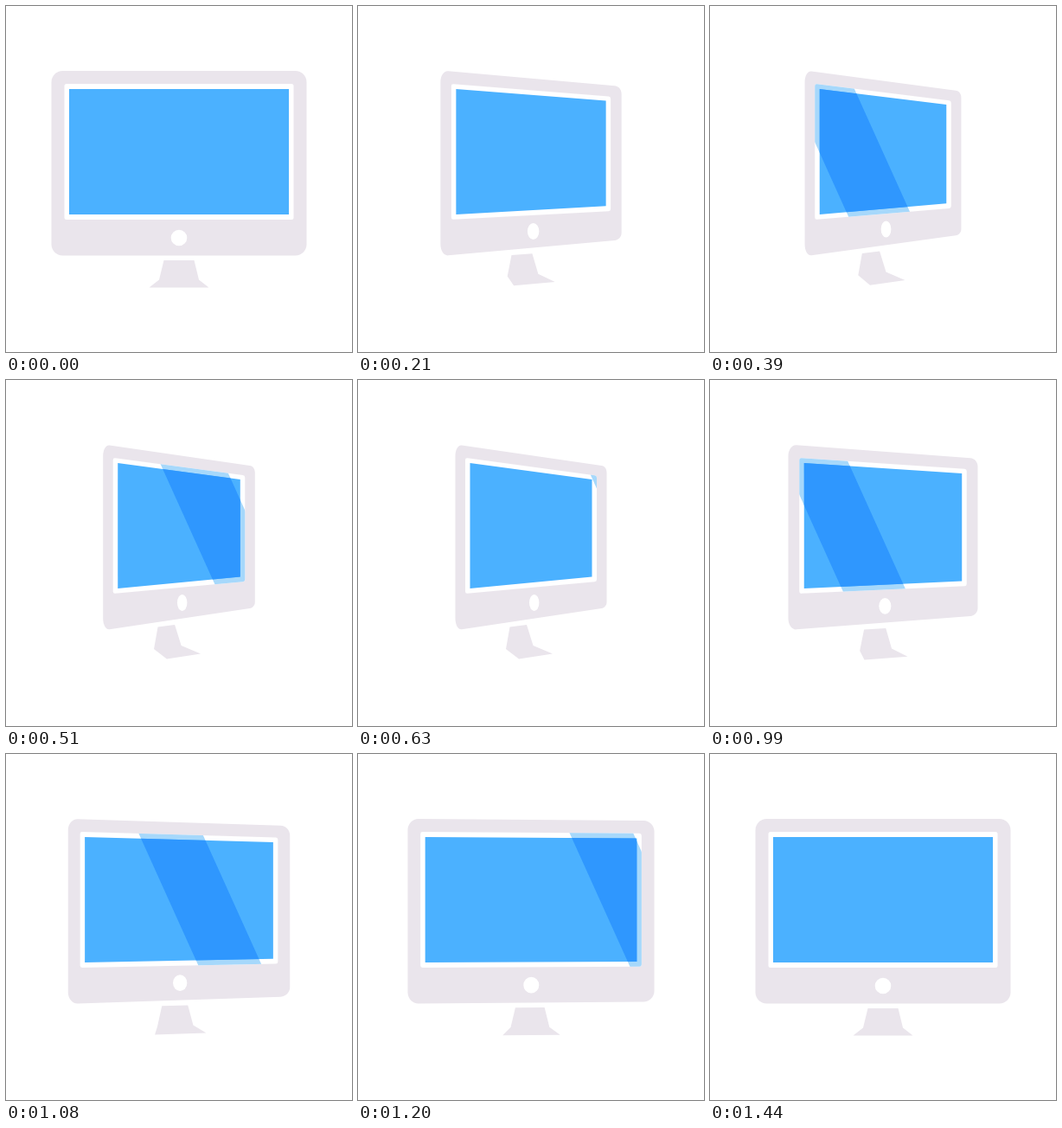
These frames come from a looping animation (400x400 px, 3620 ms). An HTML page:

```html
<!DOCTYPE html>
<html lang="en">
<head>
<meta charset="utf-8">
<title>Turning monitor</title>
<style>
  html, body { margin: 0; width: 100%; height: 100%; overflow: hidden; background: #fff; }
  svg { display: block; width: 100%; height: 100%; }
</style>
</head>
<body>
<svg viewBox="0 0 400 400">
  <defs>
    <clipPath id="bezelClip"><path class="bezel"/></clipPath>
    <clipPath id="screenClip"><path class="screen"/></clipPath>
  </defs>
  <path class="stand" fill="#eae5ec"/>
  <path class="body" fill="#eae5ec"/>
  <path class="bezel" fill="#fff"/>
  <g clip-path="url(#bezelClip)"><path class="shine" fill="#a6d8fb"/></g>
  <path class="screen" fill="#4bb1ff"/>
  <g clip-path="url(#screenClip)"><path class="shine" fill="#2f97fe"/></g>
  <path class="button" fill="#fff"/>
</svg>
<script>
const LOOP = 3620, STEP = 30;

// Each part: path facing front, path fully turned.
const parts = {
  body: [
    'M65.5 75L334.5 75C341.7 75 347.5 80.8 347.5 88L347.5 275.5C347.5 282.7 341.7 288.5 334.5 288.5L65.5 288.5C58.3 288.5 52.5 282.7 52.5 275.5L52.5 88C52.5 80.8 58.3 75 65.5 75Z',
    'M120 75.5L281.5 99C285 99.5 287.5 102.5 287.5 107L287.5 257C287.5 260.5 285 263.4 281.5 264L120 288.3C115.5 289 112.5 282.7 112.5 275.5L112.5 88C112.5 80.8 115.5 74.8 120 75.5Z'
  ],
  bezel: [
    'M70 90L330 90Q332.5 90 332.5 92.5L332.5 244.5Q332.5 247 330 247L70 247Q67.5 247 67.5 244.5L67.5 92.5Q67.5 90 70 90Z',
    'M126.5 90.3L273.5 110.2Q276 110.5 276 113L276 230.5Q276 233 273.5 233.2L126.5 246.8Q124 247 124 244.5L124 92.5Q124 90 126.5 90.3Z'
  ],
  screen: [
    'M73 96L327 96L327 241L73 241Z',
    'M129.5 96L270.5 115L270.5 227.5L129.5 241Z'
  ],
  button: [
    'M190.7 268A9.3 9.3 0 1 1 209.3 268A9.3 9.3 0 1 1 190.7 268Z',
    'M198 257.5A5.7 9.5 0 1 1 209.4 257.5A5.7 9.5 0 1 1 198 257.5Z'
  ],
  stand: [
    'M182.5 294L217.5 294L223 316.5L234.5 325.5L165.5 325.5L177 316.5Z',
    'M175.5 285.5L195 283L202.5 307L225 316.5L186 322.5L171 311Z'
  ]
};

const clamp = x => Math.min(1, Math.max(0, x));
const easeOut = x => 1 - (1 - x) ** 3;
const easeInOut = x => x < .5 ? 4 * x ** 3 : 1 - 4 * (1 - x) ** 3;

function morph([from, to], p) {
  const goal = to.match(/[\d.]+/g);
  let i = 0;
  return from.replace(/[\d.]+/g, n => +n + (goal[i++] - n) * p);
}

const each = (name, attr, value) =>
  document.querySelectorAll('.' + name).forEach(el => el.setAttribute(attr, value));

function draw(time) {
  const t = Math.floor(time % LOOP / STEP) * STEP;
  const turn = easeOut(clamp(t / 615)) - easeInOut(clamp((t - 645) / 765));
  for (const name in parts) each(name, 'd', morph(parts[name], turn));

  // The glare sweeps once while turning away and once while turning back.
  const x = t < 750 ? 126.2 + .705 * (t - 390) : 28 + .762 * (t - 870);
  each('shine', 'transform', `translate(${x})`);
}

each('shine', 'd', 'M-49 60h73.5L123.9 280h-73.5z');

let start;
function frame(now) {
  start ??= now;
  draw(now - start);
  requestAnimationFrame(frame);
}
draw(0);
requestAnimationFrame(frame);
</script>
</body>
</html>
```
